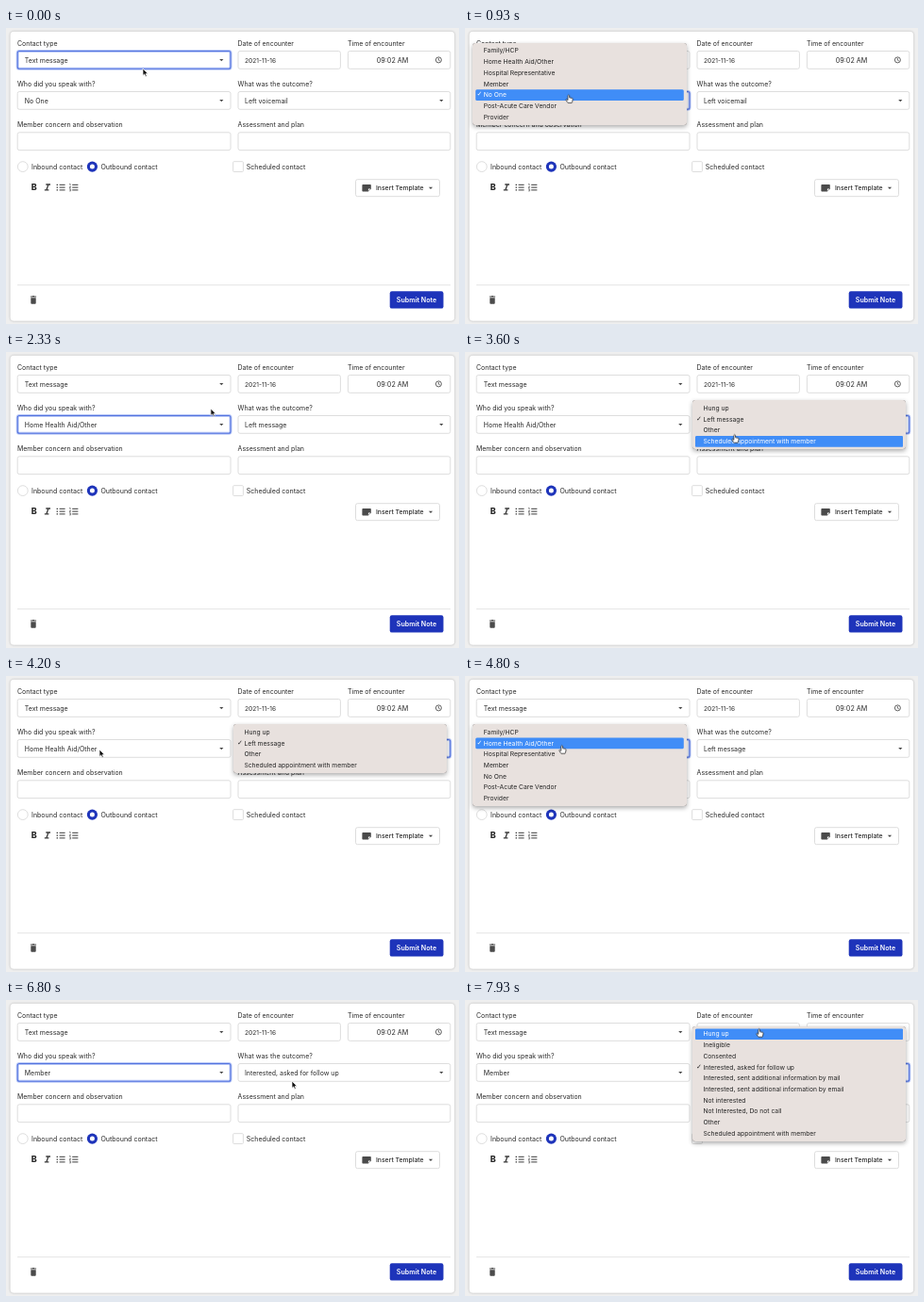
Write an HTML page that moves like this. It is 480 by 314 pixels and loops after 8 s.

```html
<!DOCTYPE html>
<html lang="en">
<head>
<meta charset="utf-8">
<title>Contact note form</title>
<style>
html, body { margin: 0; width: 100%; height: 100%; overflow: hidden; background: #efefef; }
body { position: relative; font: 6.97px Inter, "Open Sans", sans-serif; color: #242424; }
svg { position: absolute; left: 0; top: 0; overflow: visible; }
text { fill: #2a2a2a; }
.card { fill: #fff; filter: drop-shadow(0 .6px 1px #0004); }
.box { fill: #fff; stroke: #dadada; stroke-width: .9; }
.ink { fill: #4a4a4a; }
.line { fill: none; stroke: #3a3a3a; }
.ring rect { fill: none; stroke: #5474df; stroke-width: 1.1; }
.ring rect:first-child { stroke: #b9c8f6; stroke-width: 3; }

/* every part shares one 8 s clock */
.ring, .val, .menu, .hot, #cursor, #arrow, #hand { animation: 8s step-end infinite; }

.menu {
  position: absolute; width: 220.6px; padding: 2.6px 3px; border-radius: 3px;
  background: #e8e1de; box-shadow: 0 0 .6px #0009, 0 2px 5px #0005; opacity: 0;
}
.menu ul { margin: 0; padding: 0; list-style: none; }
.menu li {
  position: relative; height: 11.72px; padding-left: 8.6px;
  font-size: 6.75px; line-height: 11.9px; white-space: nowrap;
}
.menu .on::before {
  content: "✓"; position: absolute; left: 1.2px;
  font: bold 7px/11.9px "DejaVu Sans", sans-serif;
}
.menu .hot {
  --r: 20; position: absolute; left: 3px; right: 3px; top: 2.6px;
  background: #408df7; color: #fff;
  clip-path: inset(calc(var(--r) * 11.72px) 0 calc((var(--n) - 1 - var(--r)) * 11.72px) 0 round 1.5px);
}

#ring-type { animation-name: ring-type; }
#ring-who { animation-name: ring-who; }
#ring-out { animation-name: ring-out; }
@keyframes ring-type { 0% { opacity: 1 } 5.77%, 100% { opacity: 0 } }
@keyframes ring-who { 0%, 38.27%, 89.11%, 100% { opacity: 0 } 5.77%, 57.44% { opacity: 1 } }
@keyframes ring-out { 0%, 57.44% { opacity: 0 } 38.27%, 89.11%, 100% { opacity: 1 } }

.v1 { animation-name: first; }
.v2 { animation-name: second; }
.v3 { animation-name: third; }
@keyframes first { 0% { opacity: 1 } 25.77%, 100% { opacity: 0 } }
@keyframes second { 0%, 78.27%, 100% { opacity: 0 } 25.77% { opacity: 1 } }
@keyframes third { 0% { opacity: 0 } 78.27%, 100% { opacity: 1 } }

#who-a { left: 8.2px; top: 15.9px; --n: 7; animation-name: who-a; }
#who-b { left: 8.2px; top: 51.2px; --n: 7; animation-name: who-b; }
#out-a { left: 240.8px; top: 51.2px; --n: 4; animation-name: out-a; }
#out-b { left: 240.8px; top: 27.8px; --n: 10; animation-name: out-b; }
@keyframes who-a {
  0%, 27.44%, 100% { opacity: 0 } 5.77% { opacity: 1 } 25.77% { opacity: .6 } 26.61% { opacity: .25 }
}
@keyframes out-a {
  0%, 54.94%, 100% { opacity: 0 } 38.27% { opacity: 1 } 53.27% { opacity: .6 } 54.11% { opacity: .25 }
}
@keyframes who-b {
  0%, 79.94%, 100% { opacity: 0 } 57.44% { opacity: 1 } 78.27% { opacity: .6 } 79.11% { opacity: .25 }
}
@keyframes out-b { 0% { opacity: 0 } 89.11%, 100% { opacity: 1 } }

/* --r is the highlighted row, 20 is none */
#who-a .hot { animation-name: pick-who-a; }
#who-b .hot { animation-name: pick-who-b; }
#out-a .hot { animation-name: pick-out-a; }
#out-b .hot { animation-name: pick-out-b; }
@keyframes pick-who-a {
  0% { --r: 5 } 10.77% { --r: 4 } 13.27% { --r: 3 } 15.77% { --r: 2 } 17.44% { --r: 1 }
  24.11% { --r: 20 } 24.94%, 100% { --r: 1 }
}
@keyframes pick-out-a {
  0% { --r: 20 } 39.94% { --r: 2 } 43.27% { --r: 3 } 47.44%, 100% { --r: 20 }
}
@keyframes pick-who-b {
  0% { --r: 1 } 64.11% { --r: 3 } 64.94% { --r: 4 } 65.77% { --r: 6 } 69.11% { --r: 5 }
  70.77% { --r: 4 } 73.27% { --r: 3 } 76.61% { --r: 20 } 77.44%, 100% { --r: 3 }
}
@keyframes pick-out-b {
  0% { --r: 3 } 89.94% { --r: 5 } 90.77% { --r: 6 } 91.61% { --r: 8 } 94.94% { --r: 7 }
  95.77% { --r: 5 } 96.61% { --r: 4 } 97.44% { --r: 2 } 98.27% { --r: 1 } 99.11%, 100% { --r: 0 }
}

#cursor { animation-name: move; }
#hand { animation-name: hand; }
#arrow { animation-name: arrow; }
@keyframes hand {
  0%, 27.44%, 47.44%, 79.94% { opacity: 0 }
  5.77%, 38.27%, 57.44%, 89.11%, 100% { opacity: 1 }
}
@keyframes arrow {
  0%, 27.44%, 47.44%, 79.94% { opacity: 1 }
  5.77%, 38.27%, 57.44%, 89.11%, 100% { opacity: 0 }
}
@keyframes move {
  0% { transform: translate(145px, 43px) }
  .77% { transform: translate(145px, 43px); animation-timing-function: steps(4, start) }
  4.11% { transform: translate(75px, 78px) }
  9.11% { transform: translate(106px, 80px) }
  10.77% { transform: translate(106px, 80px); animation-timing-function: steps(10, start) }
  19.11% { transform: translate(122px, 36px) }
  26.61% { transform: translate(122px, 36px); animation-timing-function: steps(7, start) }
  32.44% { transform: translate(288px, 78px) }
  35.77% { transform: translate(286px, 79px) }
  42.44% { transform: translate(286px, 79px); animation-timing-function: steps(4, start) }
  45.77% { transform: translate(285px, 88px); animation-timing-function: steps(9, start) }
  53.27% { transform: translate(99px, 78px) }
  57.44% { transform: translate(99px, 78px); animation-timing-function: steps(4, start) }
  60.77% { transform: translate(102px, 74px) }
  64.11% { transform: translate(102px, 74px); animation-timing-function: steps(3, start) }
  66.61% { transform: translate(98px, 130px) }
  68.27% { transform: translate(98px, 130px); animation-timing-function: steps(7, start) }
  74.11% { transform: translate(86px, 97px) }
  79.11% { transform: translate(86px, 97px); animation-timing-function: steps(8, start) }
  85.77% { transform: translate(303px, 86px); animation-timing-function: steps(2, start) }
  87.44% { transform: translate(308px, 80px); animation-timing-function: steps(2, start) }
  89.11% { transform: translate(312px, 75px) }
  89.94% { transform: translate(312px, 75px); animation-timing-function: steps(3, start) }
  92.44% { transform: translate(318px, 130px) }
  94.94% { transform: translate(318px, 130px); animation-timing-function: steps(6, start) }
  99.9%, 100% { transform: translate(311px, 31px) }
}
</style>
</head>
<body>
<svg width="480" height="314" viewBox="0 0 480 314">
  <defs>
    <path id="caret" class="ink" d="M-2.1-1H2.1L0 1.2Z"/>
  </defs>
  <rect class="card" x="4.5" y="3.8" width="470.7" height="307" rx="4"/>

  <text x="12" y="18.7">Contact type</text>
  <text x="245.6" y="18.7">Date of encounter</text>
  <text x="362" y="18.7">Time of encounter</text>
  <text x="12" y="61.7">Who did you speak with?</text>
  <text x="245.6" y="61.7">What was the outcome?</text>
  <text x="12" y="104.9">Member concern and observation</text>
  <text x="245.6" y="104.9">Assessment and plan</text>

  <g class="box">
    <rect x="12.2" y="24.5" width="225.8" height="18.8" rx="2"/>
    <rect x="246" y="24.5" width="108.4" height="18.8" rx="2"/>
    <rect x="362.4" y="24.5" width="108.4" height="18.8" rx="2"/>
    <rect x="12.2" y="67.5" width="225.8" height="18.8" rx="2"/>
    <rect x="246" y="67.5" width="224.8" height="18.8" rx="2"/>
    <rect x="12.2" y="110.8" width="225.8" height="18.8" rx="2"/>
    <rect x="246" y="110.8" width="224.8" height="18.8" rx="2"/>
    <circle cx="17.8" cy="147.1" r="5.4"/>
    <rect x="240.6" y="141.7" width="10.8" height="10.8" rx="1"/>
    <rect x="370.5" y="160.7" width="89" height="18" rx="2"/>
  </g>
  <g class="ring" id="ring-type">
    <rect x="12.2" y="24.5" width="225.8" height="18.8" rx="2"/>
    <rect x="12.2" y="24.5" width="225.8" height="18.8" rx="2"/>
  </g>
  <g class="ring" id="ring-who">
    <rect x="12.2" y="67.5" width="225.8" height="18.8" rx="2"/>
    <rect x="12.2" y="67.5" width="225.8" height="18.8" rx="2"/>
  </g>
  <g class="ring" id="ring-out">
    <rect x="246" y="67.5" width="224.8" height="18.8" rx="2"/>
    <rect x="246" y="67.5" width="224.8" height="18.8" rx="2"/>
  </g>
  <use href="#caret" x="228.3" y="34"/>
  <use href="#caret" x="228.3" y="77"/>
  <use href="#caret" x="461.3" y="77"/>
  <use href="#caret" x="450" y="169.8"/>

  <text x="19.8" y="36.5">Text message</text>
  <text x="253" y="36.5" font-size="6.6">2021-11-16</text>
  <text x="392.8" y="36.5" font-size="7.2">09:02 AM</text>
  <path class="line" d="M458.4 31.9V34.2L459.9 35" stroke-width=".7"/>
  <circle class="line" cx="458.4" cy="33.9" r="3" stroke-width=".8"/>
  <g>
    <text class="val v1" x="19.8" y="79.5">No One</text>
    <text class="val v2" x="19.8" y="79.5">Home Health Aid/Other</text>
    <text class="val v3" x="19.8" y="79.5">Member</text>
    <text class="val v1" x="253" y="79.5">Left voicemail</text>
    <text class="val v2" x="253" y="79.5">Left message</text>
    <text class="val v3" x="253" y="79.5">Interested, asked for follow up</text>
  </g>

  <circle cx="91.4" cy="147.1" r="5.6" fill="#1e34ba"/>
  <circle cx="91.4" cy="147.1" r="2.5" fill="#fff"/>
  <text x="27" y="149.7" font-size="7.05">Inbound contact</text>
  <text x="100.4" y="149.7" font-size="7.05">Outbound contact</text>
  <text x="254.8" y="149.7" font-size="7.05">Scheduled contact</text>

  <text x="26.8" y="172.2" font-size="9" font-weight="800">B</text>
  <path class="line" d="M42.3 166H47M40.8 171.8H45.4M44.9 166L42.9 171.8" stroke-width="1.3"/>
  <path class="line" d="M56.6 166.3H62.6M56.6 169.1H62.6M56.6 171.9H62.6M70.2 166.3H76.4M70.2 169.1H76.4M70.2 171.9H76.4"/>
  <path class="line" d="M53.6 166.3H55M53.6 169.1H55M53.6 171.9H55" stroke-width="1.3"/>
  <path class="line" d="M67.2 165.4H68.1V167.2M67.1 168.4H68.6L67.2 170H68.7M67.1 171.2H68.6V172.9H67.1" stroke-width=".6"/>

  <path class="ink" d="M378.2 165.9H386Q386.8 165.9 386.8 166.7V170.4L383.8 173.5H378.2Q377.4 173.5 377.4 172.7V166.7Q377.4 165.9 378.2 165.9Z"/>
  <path d="M383.9 172.9V170.5H386.2Z" fill="#fff"/>
  <text x="392" y="172.3" font-size="6.82" font-weight="500">Insert Template</text>

  <path d="M12 272.7H471" stroke="#e2e2e2" stroke-width=".9"/>
  <path class="ink" d="M25.9 284.5H27.6L28.1 283.9H29.9L30.4 284.5H32.1V285.6H25.9ZM26.3 286.2H31.7V291.8Q31.7 292.7 30.8 292.7H27.2Q26.3 292.7 26.3 291.8Z"/>
  <rect x="406.7" y="279.2" width="56.8" height="18.4" rx="2.2" fill="#1e34ba"/>
  <text x="435" y="290.9" text-anchor="middle" font-size="7.1" font-weight="600" style="fill:#fff">Submit Note</text>
</svg>

<div class="menu" id="who-a"><ul>
  <li>Family/HCP<li>Home Health Aid/Other<li>Hospital Representative<li>Member
  <li class="on">No One<li>Post-Acute Care Vendor<li>Provider
</ul></div>
<div class="menu" id="out-a"><ul>
  <li>Hung up<li class="on">Left message<li>Other<li>Scheduled appointment with member
</ul></div>
<div class="menu" id="who-b"><ul>
  <li>Family/HCP<li class="on">Home Health Aid/Other<li>Hospital Representative<li>Member
  <li>No One<li>Post-Acute Care Vendor<li>Provider
</ul></div>
<div class="menu" id="out-b"><ul>
  <li>Hung up<li>Ineligible<li>Consented<li class="on">Interested, asked for follow up
  <li>Interested, sent additional information by mail
  <li>Interested, sent additional information by email
  <li>Not interested<li>Not Interested, Do not call<li>Other<li>Scheduled appointment with member
</ul></div>

<svg width="480" height="314" viewBox="0 0 480 314">
  <g id="cursor" stroke-linejoin="round">
    <path id="arrow" d="M0 0V7.4L1.7 5.9 2.9 8.5 4.2 7.9 3.1 5.4H5.3Z" fill="#111" stroke="#fff" stroke-width=".7"/>
    <path id="hand" transform="translate(.7 -.4) scale(.93)" d="M-.9.8Q0-.5.9.8V3.2L3.9 3.9Q4.8 4.2 4.7 5.2L4.2 7.6 3.5 9.3H-.8L-3 6.2Q-3.4 5.1-2.3 5.1L-.9 6.1Z" fill="#fff" stroke="#222" stroke-width=".8"/>
  </g>
</svg>
<script>
// A highlighted copy of each list, clipped to one row by CSS
for (const list of document.querySelectorAll(".menu ul")) {
  const hot = list.cloneNode(true);
  hot.className = "hot";
  hot.setAttribute("aria-hidden", "true");
  list.after(hot);
}
</script>
</body>
</html>
```
